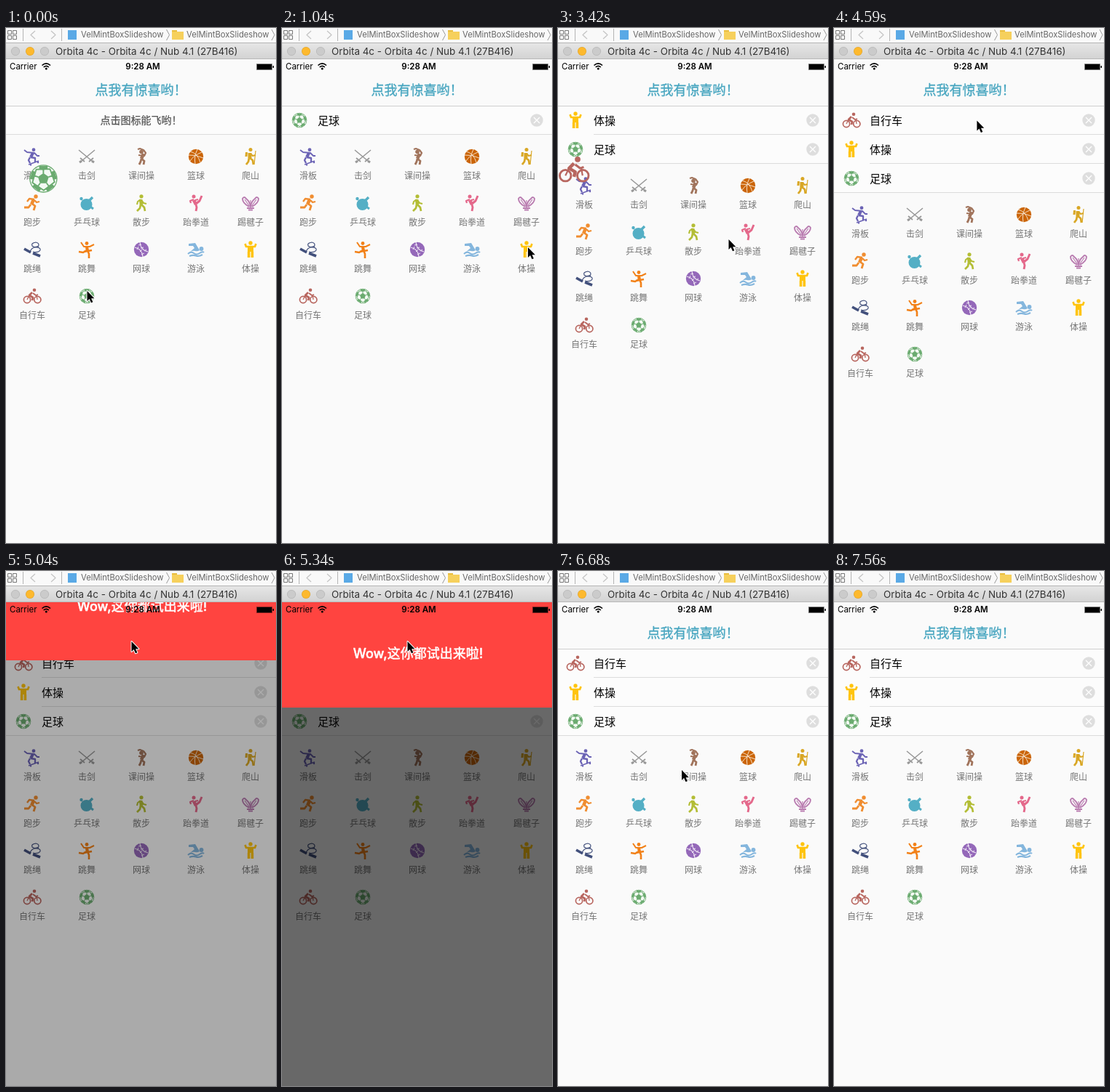
Animation, 371 px wide and 709 px high, one loop 7860 ms. Source, as an HTML page with a canvas:

```html
<!DOCTYPE html>
<html lang="zh-CN">
<head>
<meta charset="utf-8">
<style>
html, body { margin: 0; width: 100%; height: 100%; overflow: hidden; background: #fafafa; }
canvas { display: block; width: 371px; height: 709px; }
</style>
</head>
<body>
<canvas id="stage"></canvas>
<script>
const W = 371, H = 709, LOOP = 7860, STEP = 148.2, LAST_STEP = 51;
const CJK = '"Noto Sans CJK SC", "Noto Sans CJK", sans-serif';
const LATIN = 'Inter, Roboto, sans-serif';

const canvas = document.getElementById('stage');
const ctx = canvas.getContext('2d');
const dpr = window.devicePixelRatio || 1;
canvas.width = W * dpr;
canvas.height = H * dpr;

const dot = (x, y, r) =>
  `M${x - r} ${y}a${r} ${r} 0 1 0 ${2 * r} 0a${r} ${r} 0 1 0 ${-2 * r} 0z`;
const polar = (r, a) => `${(r * Math.sin(a)).toFixed(2)} ${(-r * Math.cos(a)).toFixed(2)}`;
const fifths = fn => [0, 1, 2, 3, 4].map(k => fn(k * Math.PI * 0.4)).join('');

// An icon is a label, a colour and layers of [path, stroke width (0 fills), colour override].
const icon = (label, color, ...layers) => ({
  label, color,
  layers: layers.map(([d, width, tint]) => ({ path: new Path2D(d), width, tint }))
});

const icons = [
  icon('滑板', '#6b63b5', [dot(2, -9.3, 2.4), 0],
    ['M-11 -9L-7 -6L3 -5L7 -1L10 -1', 1.8], ['M1 -5L-2 1', 4],
    ['M-2 1L4 2L4 8M-3 1L-5 5L-3 9', 2.3], ['M-5 11L9 6', 1.5],
    [dot(-2, 11.4, 1.2) + dot(8, 8, 1.2), 0]),
  icon('击剑', '#999', ['M-11 -9L7 6M11 -9L-7 6', 1.6],
    ['M3 7L9 2M-3 7L-9 2', 1.8], ['M7 6L10 8M-7 6L-10 8', 3.2]),
  icon('课间操', '#a1745c', [dot(0, -6.5, 2.8), 0],
    ['M-5 -10L-2 -11L3 -9L6 -5L4 -1L-4 -2', 2.2], ['M3 -4L0 3', 4.5],
    ['M0 3L4 6L3 11M0 3L-1 7L-3 11', 2.8]),
  icon('篮球', '#cb6507', [dot(0, 0, 10.2), 0],
    ['M-10 -2Q0 -3 10 2M2 -10Q-3 0 -1 10M-8 -7Q2 -5 6 8M-8 6Q-4 -1 8 -6', 1, '#f6dfc8']),
  icon('爬山', '#d9a725', [dot(0, -9.5, 2.5), 0],
    ['M-1 -5L-1 2', 5], ['M-5.5 -6L-6 0', 3], ['M0 -4L3 -1L7 -2', 2],
    ['M-1 2L3 5L4 11M-2 2L-3 7L-6 11', 2.8], ['M7 -8L5 11', 1.2]),
  icon('跑步', '#f08d30', [dot(5, -9, 2.7), 0],
    ['M2 -5L-1 2', 4.5], ['M3 -5L-4 -6L-7 -2M3 -4L6 -1L10 -2', 2.3],
    ['M0 1L4 4L2 10M-2 2L-5 6L-11 6', 2.8]),
  icon('乒乓球', '#54afc5', [dot(-.5, 2, 8), 0], ['M3 -3L8 -8', 3.4],
    [dot(-7.5, -6, 2.2), 0], ['M5 5L9 8', 3]),
  icon('散步', '#b3bd35', [dot(0, -9.2, 2.6), 0],
    ['M-1 -5L0 2', 4.5], ['M-1 -5L-5 -2L-6 2M0 -4L3 0L7 1', 2.1],
    ['M0 2L4 6L5 11M-1 2L-2 7L-6 11', 2.7]),
  icon('跆拳道', '#e4688b', [dot(-3, -9, 2.5), 0],
    ['M-3 -4L0 2', 4.5], ['M-3 -5L-8 -3L-7 0M-1 -4L3 -5', 2.2],
    ['M0 1L5 -3L8 -10M0 2L1 6L0 11', 2.9]),
  icon('踢毽子', '#b97cb0',
    ['M-2 5Q-11 0 -11 -6Q-9 -10 -6 -6Q-1 -2 0 5Q1 -2 6 -6Q9 -10 11 -6Q11 0 2 5', 1.9],
    ['M-8 -5L-1 5M8 -5L1 5M0 -4L0 5', 1.2], ['M-5 7L5 7M-3 9.5L3 9.5', 2.2]),
  icon('跳绳', '#42507c', ['M-11 -1L-2 4', 3.6], ['M1 5L11 9', 3.6],
    ['M-3 3Q-1 -3 5 -3Q12 -3 11 1Q8 5 1 3M8 -3Q11 -9 5 -10Q-2 -9 0 -5Q3 -2 9 -5', 1.2]),
  icon('跳舞', '#f28118', [dot(0, -8.5, 2.4), 0],
    ['M0 -4L1 2', 4.2], ['M-8 -10L-4 -4L4 -4L10 -7', 2],
    ['M1 1L3 6L3 12M0 1L-5 4L-11 3', 2.6], ['M-4 3L7 1', 2.4]),
  icon('网球', '#9468b9', [dot(0, 0, 10.2), 0],
    ['M-9 -3Q1 -1 2 10M-2 -10Q-1 1 9 3', 1.2, '#f1e8f6'],
    ['M-6 0L-4 -4M-2 3L1 0M0 7L4 5M-4 -6L0 -7M-1 -2L3 -3M4 2L7 0', 1, '#f1e8f6']),
  icon('游泳', '#84b6dd', [dot(7.5, -1, 2.9), 0],
    ['M-10 -8L-1 -9L5 1Q2 3 -1 2T-8 3L-2 -2L-4 -5L-10 -5z', 0],
    ['M-11 6Q-7 2 -3 5T5 5T11 4M-9 9Q-4 7 0 8.5T9 7', 2.1]),
  icon('体操', '#ffc40c', [dot(0, -9, 2.7), 0],
    ['M-7.5 -8L-6 -4L6 -4L7.5 -8', 2.7], ['M0 -3L0 3', 8],
    ['M-2.4 3L-2.4 11M2.4 3L2.4 11', 3.6]),
  icon('自行车', '#b8665f', [dot(-7, 5, 4.6) + dot(7.3, 5, 4.6), 1.7],
    [dot(3, -8.3, 2.3), 0], ['M0 -5L-4 -1L1 2L0 6', 2.7], ['M1 -4L5 -1L8 -2', 1.8],
    ['M-7 5L-4 -1M6 -1L7 5', 1.3]),
  icon('足球', '#6bab70', [dot(0, 0, 10.3), 0], [dot(0, 0, 9.6), 0, '#f4faf4'],
    [fifths(a => (a ? 'L' : 'M') + polar(4.2, a)) + 'z', 0],
    [fifths(a => `M${polar(4, a)}L${polar(7, a)}M${polar(7, a)}L${polar(8.6, a + .6)}L${polar(7, a + 1.257)}`), 1],
    [fifths(a => `M${polar(6.3, a)}L${polar(8, a + .4)}L${polar(10, a + .32)}L${polar(10, a - .32)}L${polar(8, a - .4)}z`), 0])
];
const [GYM, BIKE, BALL] = icons.slice(-3);

// Flights and pointer keys are measured in time steps.
const FLIGHT = 4.12;
const flights = [
  { item: BALL, start: -2.75, x: 111, y: 369, bow: -7 },
  { item: GYM, start: 9, x: 336, y: 305, bow: 0 },
  { item: BIKE, start: 19.87, x: 36, y: 409, bow: -27 }
];
const pointerKeys = [
  [0, 111.5, 362], [2, 111.5, 362], [7, 338, 302], [9, 338, 302], [13, 40.5, 362],
  [14, 36, 376], [16, 36, 376], [18, 35, 404], [20, 35, 404], [23, 234.5, 291],
  [27, 292, 250], [32, 172.5, 97], [36, 172.5, 97], [41, 170, 274],
  [46, 170, 274], [50, 347, 673]
];
const panelKeys = [[33, 0], [34, .55], [35, .93], [36, 1], [43, 1], [44, .99], [45, 0]];
const pointer = new Path2D('M0 0V14L3.1 11L5.5 16.3L7.9 15.3L5.6 10.2H9.9Z');

function tween(keys, t) {
  const next = keys.findIndex(k => k[0] > t);
  if (next < 0) return keys[keys.length - 1].slice(1);
  if (next === 0) return keys[0].slice(1);
  const a = keys[next - 1], b = keys[next];
  const p = (t - a[0]) / (b[0] - a[0]);
  return a.slice(1).map((v, i) => v + (b[i + 1] - v) * p);
}

function rect(x, y, w, h, fill) {
  ctx.fillStyle = fill;
  ctx.fillRect(x, y, w, h);
}

function disc(x, y, r, fill) {
  ctx.fillStyle = fill;
  ctx.fill(new Path2D(dot(x, y, r)));
}

function line(d, color, width = 1) {
  ctx.strokeStyle = color;
  ctx.lineWidth = width;
  ctx.stroke(new Path2D(d));
}

// A thin outline of width `bolder` gives weights between regular and bold.
function text(str, x, baseline, font, color, align = 'left', bolder = 0) {
  ctx.font = font;
  ctx.fillStyle = ctx.strokeStyle = color;
  ctx.textAlign = align;
  ctx.fillText(str, x, baseline);
  if (!bolder) return;
  ctx.lineWidth = bolder;
  ctx.lineJoin = 'round';
  ctx.strokeText(str, x, baseline);
}

// Chinese text, placed by the middle of its em box.
function hanzi(str, x, y, size, color, align = 'center', bolder = 0) {
  text(str, x, y + size * .38, `${size}px ${CJK}`, color, align, bolder);
}

function drawIcon({ color, layers }, x, y, scale = 1) {
  ctx.save();
  ctx.translate(x, y);
  ctx.scale(scale, scale);
  ctx.lineJoin = 'round';
  for (const { path, width, tint } of layers) {
    ctx.fillStyle = ctx.strokeStyle = tint || color;
    ctx.lineWidth = width;
    if (width) ctx.stroke(path); else ctx.fill(path);
  }
  ctx.restore();
}

function drawWindowBars() {
  rect(0, 0, W, 21, '#f9f9f9');
  for (const [x, y] of [[2.5, 3.5], [9.5, 3.5], [2.5, 10.5], [9.5, 10.5]])
    line(`M${x} ${y}h5v5h-5z`, '#777');
  line('M23.5 1V18M76.5 1V18', '#b5b5b5');
  line('M40 4L34 9.5L40 15M62 4L68 9.5L62 15', '#c4c4c4', 1.2);
  rect(85, 3, 12, 13, '#5aa9e6');
  rect(228, 3, 7, 4, '#e9bd3f');
  rect(228, 5, 16, 11, '#f6d05c');
  line('M220.5 2L224.5 9.5L220.5 17M365 2L369 9.5L365 17', '#999');
  for (const x of [103, 248])
    text('VelMintBoxSlideshow', x, 13.3, `11.2px ${LATIN}`, '#666');

  const bar = ctx.createLinearGradient(0, 21, 0, 43);
  bar.addColorStop(0, '#e6e6e6');
  bar.addColorStop(1, '#d2d2d2');
  rect(0, 21, W, 22, bar);
  rect(0, 20, W, 1, '#b4b4b4');
  rect(0, 42, W, 1, '#b8b8b8');
  ['#cbcbcb', '#fdb92e', '#cbcbcb'].forEach((c, i) => {
    disc(13 + i * 20, 32, 6, c);
    line(dot(13 + i * 20, 32, 5.7), 'rgba(0,0,0,.12)', .7);
  });
  text('Orbita 4c - Orbita 4c / Nub 4.1 (27B416)', 68, 37, `13.4px ${LATIN}`, '#333');
}

function drawStatus() {
  text('Carrier', 5, 57.3, `11.5px ${LATIN}`, '#000');
  text('9:28 AM', 188, 57.3, `600 11.5px ${LATIN}`, '#000', 'center');
  line('M49.5 51.5Q55.3 46.2 61 51.5M51.7 54Q55.3 50.6 58.8 54', '#000', 1.6);
  disc(55.3, 56, 1.5, '#000');
  line('M344.5 49.5h21v8h-21z', 'rgba(0,0,0,.5)');
  rect(345, 50, 20, 7, '#000');
  rect(366.5, 52, 1.5, 3, '#000');
}

function drawRow(item, y) {
  drawIcon(item, 24, y);
  hanzi(item.label, 49, y, 15, '#000', 'left');
  disc(350, y, 8.7, '#dedede');
  line(`M346 ${y - 4}l8 8m0 -8l-8 8`, '#fff', 1.3);
}

function drawPage(t) {
  rect(0, 43, W, H - 43, '#fafafa');
  hanzi('点我有惊喜哟！', 185.5, 85, 18, '#48a6c0', 'center', .35);
  rect(0, 107, W, 1, '#cfcfcf');

  const rows = flights.filter(f => t >= f.start + FLIGHT).map(f => f.item).reverse();
  const slots = Math.max(1, rows.length);
  rect(0, 108, W, 39 + (slots - 1) * 40, '#fcfcfc');
  if (!rows.length) hanzi('点击图标能飞哟！', 185.5, 127, 14, '#555', 'center', .25);
  rows.forEach((item, i) => drawRow(item, 127 + i * 40));
  for (let i = 0; i < slots; i++) {
    const x = i === slots - 1 ? 0 : 49;
    rect(x, 146 + i * 40, W - x, 1, '#dcdcdc');
  }

  const top = 177 + (slots - 1) * 40;
  icons.forEach((item, i) => {
    const x = 36 + (i % 5) * 75, y = top + Math.floor(i / 5) * 64;
    drawIcon(item, x, y);
    hanzi(item.label, x, y + 26, 12, '#757575');
  });

  for (const { item, start, x, y, bow } of flights) {
    const p = (t - start) / FLIGHT;
    if (p < 0 || p >= 1) continue;
    drawIcon(item, x + (24 - x) * p + bow * p * (1 - p), y + (127 - y) * p,
      1 + Math.sin(Math.PI * p));
  }
}

function drawPanel(t) {
  const [p] = tween(panelKeys, t);
  if (!p) return;
  const bottom = Math.ceil(43 + 144.5 * p);
  rect(0, 43, W, H - 43, `rgba(0,0,0,${.585 * p})`);
  ctx.save();
  ctx.beginPath();
  ctx.rect(0, 43, W, bottom - 43);
  ctx.clip();
  rect(0, 43, W, bottom - 43, '#ff4440');
  text('Wow,这你都试出来啦!', 187, bottom - 68, `500 18px Inter, ${CJK}`, '#fff', 'center', .5);
  ctx.restore();
}

function drawPointer(t) {
  if (t >= LAST_STEP) return;
  const [x, y] = tween(pointerKeys, t);
  ctx.save();
  ctx.translate(x, y);
  ctx.lineJoin = 'round';
  ctx.strokeStyle = '#fff';
  ctx.lineWidth = 2;
  ctx.stroke(pointer);
  ctx.fillStyle = '#000';
  ctx.fill(pointer);
  ctx.restore();
}

const origin = performance.now();
function render() {
  const ms = (performance.now() - origin) % LOOP;
  // The picture advances in even, held steps.
  const t = Math.min(LAST_STEP, Math.floor(ms / STEP + .05));
  ctx.setTransform(dpr, 0, 0, dpr, 0, 0);
  drawPage(t);
  drawPanel(t);
  drawStatus();
  drawWindowBars();
  drawPointer(t);
  requestAnimationFrame(render);
}
render();
</script>
</body>
</html>
```
